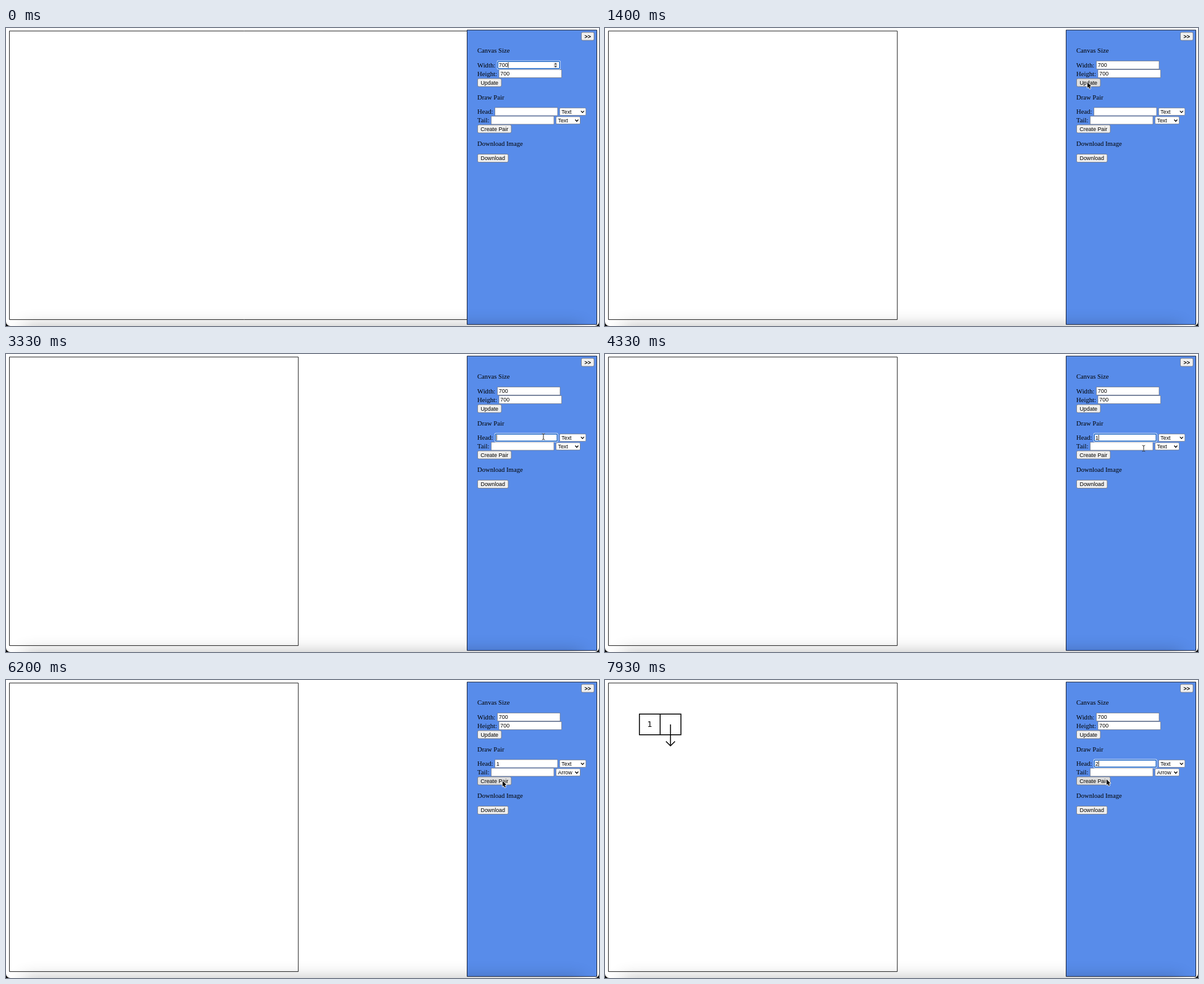
An HTML page with a canvas that plays this animation: 960x483 px, repeating every 8 s.

```html
<!DOCTYPE html>
<html lang="en">
<head>
<meta charset="utf-8">
<title>Pair drawing tool</title>
<style>
  html, body { margin: 0; width: 100%; height: 100%; overflow: hidden; background: #fff; }
  canvas { display: block; }
</style>
</head>
<body>
<canvas width="960" height="483"></canvas>
<script>
const ctx = document.querySelector('canvas').getContext('2d');
const LOOP = 8000;
const SERIF = '10.67px "Liberation Serif", serif';
const SANS = '8.9px "Liberation Sans", sans-serif';
const MENU_FONT = '8.7px Inter, sans-serif';

// Moments at which the interface changes
const AT = {
  resize: 1150, focusHead: 3000, typeOne: 3900, openMenu: 4900,
  pick: 5700, create: 6450, refocus: 7250, typeTwo: 7600
};

// Pointer stops: time, x, y
const POINTER = [
  [450, 846, 68], [1050, 781, 88], [1850, 781, 88], [2700, 870, 134],
  [4000, 870, 134], [4330, 872, 153], [4750, 908, 150], [5050, 908, 151],
  [5450, 908, 189], [5750, 908, 189], [6250, 801, 163], [6650, 801, 163],
  [7000, 809, 148], [7200, 813, 136], [7650, 813, 136], [7900, 812, 161]
];

const BUTTONS = [
  { label: 'Update', x: 763.5, y: 82, w: 38.5 },
  { label: 'Create Pair', x: 763.5, y: 157, w: 54.5 },
  { label: 'Download', x: 763.5, y: 204.5, w: 49.5 },
  { label: '>>', x: 931.5, y: 7, w: 20.5, bold: true }
];
const FIELDS = {
  width: { x: 795.5, y: 53.5 }, height: { x: 798, y: 67.5 },
  head: { x: 791.5, y: 129 }, tail: { x: 785.5, y: 143 }
};
const FIELD_W = 101.5, ROW_H = 13;

const between = (t, a, b) => t >= a && t < b;
const inside = (p, x, y, w, h) => p && between(p.x, x, x + w) && between(p.y, y, y + h);

function text(str, x, y, font = SERIF, color = '#000', align = 'left') {
  ctx.font = font;
  ctx.fillStyle = color;
  ctx.textAlign = align;
  ctx.fillText(str, x, y);
}

function box(x, y, w, h, r, fill, stroke, lineWidth = 1) {
  ctx.beginPath();
  ctx.roundRect(x, y, w, h, r);
  if (fill) { ctx.fillStyle = fill; ctx.fill(); }
  if (stroke) { ctx.strokeStyle = stroke; ctx.lineWidth = lineWidth; ctx.stroke(); }
}

function line(points, color, width) {
  ctx.beginPath();
  points.forEach(([x, y]) => ctx.lineTo(x, y));
  ctx.strokeStyle = color;
  ctx.lineWidth = width;
  ctx.stroke();
}

function shape(points, fill) {
  ctx.beginPath();
  points.forEach(([x, y]) => ctx.lineTo(x, y));
  ctx.closePath();
  ctx.fillStyle = fill;
  ctx.fill();
}

function pointerAt(t) {
  if (t < POINTER[0][0]) return null;
  const next = POINTER.findIndex(stop => stop[0] > t);
  if (next < 0) {
    const [, x, y] = POINTER.at(-1);
    return { x, y };
  }
  const [t0, x0, y0] = POINTER[next - 1], [t1, x1, y1] = POINTER[next];
  const u = (t - t0) / (t1 - t0), ease = u * u * (3 - 2 * u);
  return { x: x0 + (x1 - x0) * ease, y: y0 + (y1 - y0) * ease };
}

function drawButton({ label, x, y, w, bold }, pointer) {
  const hover = inside(pointer, x, y, w, ROW_H);
  box(x, y, w, ROW_H, 2, hover ? '#dedede' : '#efefef', '#6f737c', 0.8);
  text(label, x + w / 2, y + 9.6, bold ? 'bold ' + SANS : SANS, '#000', 'center');
}

// caretSince is the time of the last keystroke or click in a focused field
function drawField({ x, y }, value, t, caretSince, selected) {
  const focused = caretSince !== undefined;
  if (focused) {
    box(x - 0.7, y - 0.7, FIELD_W + 1.4, ROW_H + 1.4, 2, '#fff');
    box(x + 0.7, y + 0.7, FIELD_W - 1.4, ROW_H - 1.4, 1, '#fff', '#1460c4', 1.5);
  } else {
    box(x, y, FIELD_W, ROW_H, 0, '#fff', '#686f7e', 0.7);
  }
  ctx.font = SANS;
  const end = x + 2.3 + ctx.measureText(value).width;
  if (selected) box(x + 2, y + 2, end - x - 2, 9.5, 0, '#b4d5fe');
  text(value, x + 2.3, y + 9.8, SANS);
  if (focused && !selected && (t - caretSince) % 1000 < 500)
    line([[end + 0.5, y + 2], [end + 0.5, y + 11]], '#000', 0.8);
}

function drawSelect(x, y, w, value) {
  box(x, y, w, 11.8, 1.5, '#fff', '#6f737c', 0.7);
  text(value, x + 3, y + 8.9, SANS);
  const cx = x + w - 5.5, cy = y + 4.7;
  line([[cx - 2.5, cy], [cx, cy + 2.7], [cx + 2.5, cy]], '#000', 1.3);
}

function drawSpinner() {
  box(886.5, 55.5, 6.5, 9.5, 1, '#ececec');
  shape([[887.3, 59.3], [889.7, 56.5], [892.1, 59.3]], '#444');
  shape([[887.3, 61.3], [889.7, 64.1], [892.1, 61.3]], '#444');
}

function drawMenu(pointer) {
  ctx.save();
  ctx.shadowColor = 'rgba(0,0,0,.4)';
  ctx.shadowBlur = 9;
  ctx.shadowOffsetY = 3;
  box(884, 139, 53, 65.5, 4, '#33415f');
  ctx.restore();
  box(884, 139, 53, 65.5, 4, null, '#27334b', 0.8);
  ['Text', 'Empty', 'Null', 'Arrow'].forEach((label, i) => {
    const y = 142.5 + i * 14.6;
    if (inside(pointer, 884, y, 53, 14.6)) box(887, y + 0.2, 46.5, 14.2, 3, '#1e70dc');
    text(label, 900, y + 10.6, MENU_FONT, '#fff');
  });
  line([[891, 150], [892.8, 152.3], [896, 147]], '#fff', 1.1);
}

function drawPair() {
  box(55.7, 55.2, 67.2, 33.6, 0, null, '#000', 1.5);
  line([[89.3, 55], [89.3, 89]], '#000', 1.5);
  text('1', 72.5, 75.8, '12.5px "DejaVu Sans", sans-serif', '#000', 'center');
  line([[106, 72], [106, 106.5]], '#000', 1.5);
  line([[98.7, 99.5], [106, 106.7], [113.3, 99.5]], '#000', 1.5);
}

function drawPointer({ x, y }, overField) {
  ctx.save();
  ctx.translate(x, y);
  ctx.lineJoin = 'round';
  if (overField) {
    const stem = [[0, -4], [0, 4]];
    line(stem, '#fff', 2);
    line(stem, '#222', 1);
    for (const s of [-1, 1]) line([[-2.3, 5 * s], [0, 4 * s], [2.3, 5 * s]], '#222', 0.9);
  } else {
    const arrow = [[0, 0], [0, 9], [2, 7.2], [3.5, 10.5], [5, 9.8], [3.6, 6.6], [6.4, 6.4]];
    line([...arrow, arrow[0]], '#fff', 1.6);
    shape(arrow, '#000');
  }
  ctx.restore();
}

function drawPage(t) {
  ctx.fillStyle = '#000';
  ctx.fillRect(0, 0, 960, 483);
  box(0, -10, 960, 493, 7, '#fff');
  box(5.5, 4.9, (t < AT.resize ? 760 : 467.7), 467.7, 0, null, '#222', 1);
  if (t >= AT.create) drawPair();
  box(746.5, 3.3, 210, 477.3, 0, '#588cea', '#1c2740', 1);
}

function drawBottomShade() {
  ctx.save();
  ctx.shadowColor = 'rgba(0,0,0,.3)';
  ctx.shadowBlur = 28;
  ctx.fillStyle = '#000';
  ctx.fillRect(28, 485, 904, 40);
  ctx.restore();
}

function draw(t) {
  const menuOpen = between(t, AT.openMenu, AT.pick);
  const pointer = pointerAt(t);
  const hoverPoint = menuOpen ? null : pointer;

  drawPage(t);
  drawBottomShade();

  text('Canvas Size', 763, 40.3);
  text('Width:', 763, 63.5);
  text('Height:', 763, 77.6);
  text('Draw Pair', 763, 115.6);
  text('Head:', 763, 139);
  text('Tail:', 763, 153);
  text('Download Image', 763, 191);
  BUTTONS.forEach(button => drawButton(button, hoverPoint));

  const widthFocused = t < AT.resize;
  drawField(FIELDS.height, '700', t);
  drawField(FIELDS.width, '700', t, widthFocused ? 0 : undefined);
  if (widthFocused) drawSpinner();

  let caretSince;
  if (t >= AT.refocus) caretSince = t >= AT.typeTwo ? AT.typeTwo : AT.refocus;
  else if (between(t, AT.focusHead, AT.openMenu)) caretSince = t >= AT.typeOne ? AT.typeOne : AT.focusHead;
  const head = t >= AT.typeTwo ? '2' : t >= AT.typeOne ? '1' : '';
  drawField(FIELDS.tail, '', t);
  drawField(FIELDS.head, head, t, caretSince, between(t, AT.refocus, AT.typeTwo));

  drawSelect(896.3, 129.7, 42.5, 'Text');
  drawSelect(890.5, 143.8, 39, t >= AT.pick ? 'Arrow' : 'Text');
  if (menuOpen) drawMenu(pointer);

  if (pointer) {
    const overField = Object.values(FIELDS).some(f => inside(hoverPoint, f.x, f.y, FIELD_W, ROW_H));
    drawPointer(pointer, overField);
  }
}

function tick() {
  draw(performance.now() % LOOP);
  requestAnimationFrame(tick);
}
tick();
</script>
</body>
</html>
```
